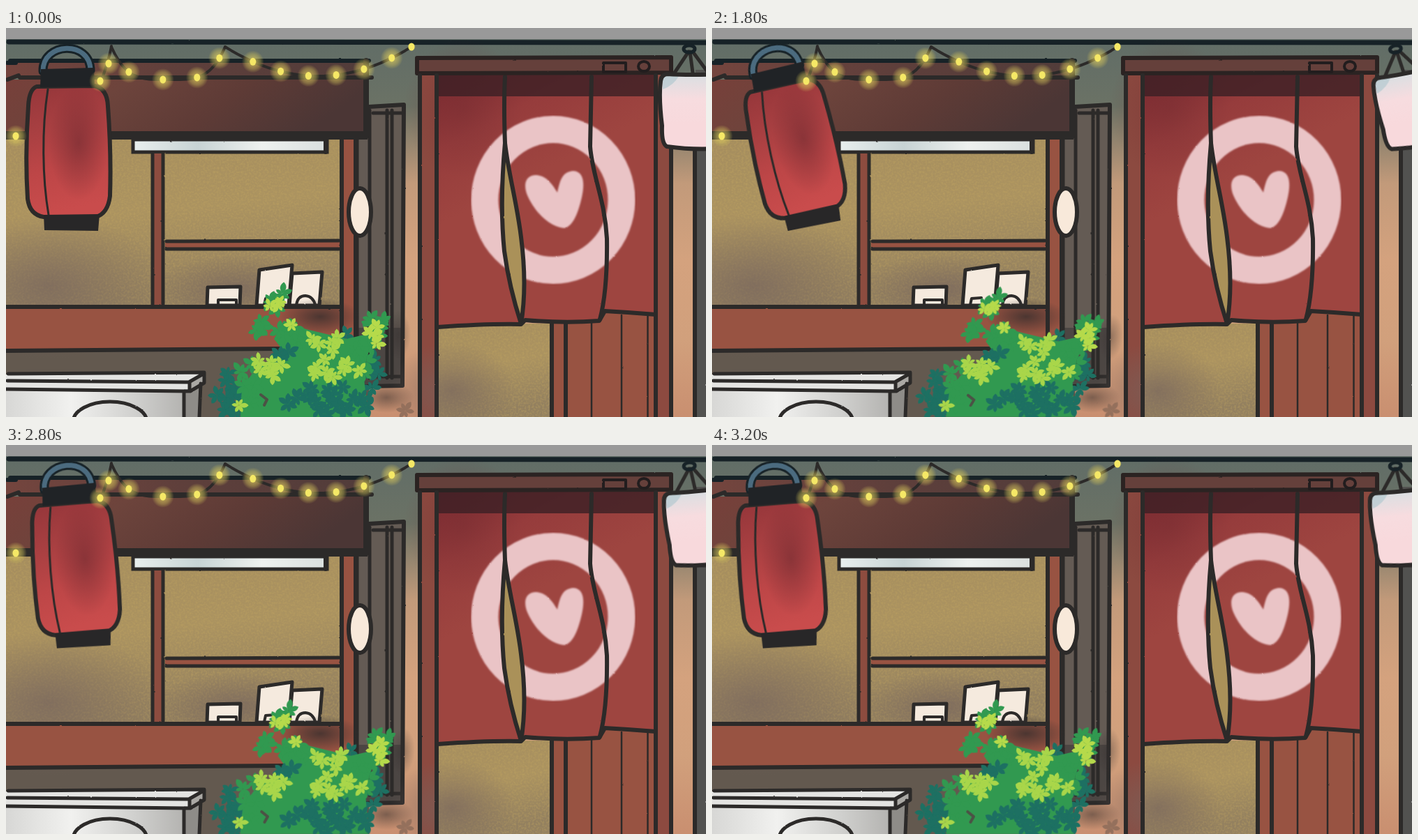
An HTML page that plays this animation: 1003x558 px, repeating every 3400 ms.

```html
<!DOCTYPE html>
<html lang="en">
<head>
<meta charset="utf-8">
<title>Shop front in the breeze</title>
<style>
html, body { margin: 0; width: 100%; height: 100%; overflow: hidden; background: #999; }
svg { display: block; width: 1003px; height: 558px; }
#lantern { transform-origin: 87px 35px; }
#lamp { transform-origin: 980px 28px; }
#bush { transform-origin: 0 550px; }
</style>
</head>
<body>
<svg id="stage" viewBox="0 0 1003 558" xmlns="http://www.w3.org/2000/svg"></svg>
<script>
const INK = '#2c2a29', NIGHT = '#172227', WOOD = '#985342', PINK = '#eac4c6';

let seed = 11;
const rnd = () => (seed = (seed * 16807) % 2147483647) / 2147483647;
const repeat = (n, make) => Array.from({ length: n }, (_, i) => make(i)).join('');

const box = (x, y, x2, y2, fill, more = '') =>
  `<rect x="${x}" y="${y}" width="${x2 - x}" height="${y2 - y}" fill="${fill}" ${more}/>`;
const shape = (d, fill, more = '') => `<path d="${d}" fill="${fill}" ${more}/>`;
const line = (d, w = 6, color = INK) =>
  shape(d, 'none', `stroke="${color}" stroke-width="${w}" stroke-linecap="round" stroke-linejoin="round"`);
const bars = (y, y2, w, ...xs) => line(xs.map(x => `M${x} ${y}V${y2}`).join(''), w);
const oval = (x, y, rx, ry, fill, more = '') =>
  `<ellipse cx="${x}" cy="${y}" rx="${rx}" ry="${ry}" fill="${fill}" ${more}/>`;
const group = (inner, more) => `<g ${more}>${inner}</g>`;

// Colours are spread evenly along a gradient.
const stops = colors => colors.map((c, i) =>
  `<stop offset="${i / (colors.length - 1)}" stop-color="${c}"/>`).join('');
const linear = (id, dx, dy, ...colors) =>
  `<linearGradient id="${id}" x1="0" y1="0" x2="${dx}" y2="${dy}">${stops(colors)}</linearGradient>`;
const radial = (id, ...colors) => `<radialGradient id="${id}">${stops(colors)}</radialGradient>`;

const defs = `<defs>
${linear('wall', 0, 1, '#5f6c67', '#6b7265', '#c29a7a', '#d4a27e', '#d1a07c', '#c98f70')}
${linear('awning', 1, .2, '#77403a', '#6d443c', '#5e3b36', '#4b3635')}
${linear('strip', 1, 0, '#74453e', '#5e3f3b', '#513c3a')}
${linear('glass', .2, 1, '#a58d5e', '#ab9360', '#93805f')}
${linear('cloth', .45, 1, '#7c2a30', '#963c3c', '#9e4540', '#9e4540', '#9e4540')}
${linear('red', .15, 1, '#95363a', '#a73f41', '#bd4647', '#c94c4c')}
${linear('white', 1, 0, '#e9efee', '#c7d3d4', '#eef1ef', '#d9dfde')}
${linear('stand', 1, 0, '#d7d7d5', '#f1f1ef', '#cfcfcd', '#aaa9a6')}
${linear('shade', 0, 1, '#d9dfe2', '#f7dcdf', '#f8d9dc', '#f8d9dc')}
${radial('glow', '#f6e468cc', '#e2d05f99', '#d2c35a66', '#d2c35a00')}
${radial('dusk', '#76645db3', '#76645d00')}
${radial('murk', '#302b2bbb', '#302b2b00')}
${radial('dim', '#6f2a3099', '#6f2a3000')}
<filter id="rough" x="0" y="0" width="1003" height="558" filterUnits="userSpaceOnUse" color-interpolation-filters="sRGB">
  <feTurbulence type="fractalNoise" baseFrequency=".12" numOctaves="2" seed="4"/>
  <feDisplacementMap in="SourceGraphic" scale="1.6" xChannelSelector="R" yChannelSelector="G"/>
</filter>
<filter id="grain" x="0" y="0" width="100%" height="100%" color-interpolation-filters="sRGB">
  <feTurbulence type="fractalNoise" baseFrequency=".35" numOctaves="2" seed="8"/>
  <feColorMatrix values="0 0 0 0 .76  0 0 0 0 .65  0 0 0 0 .38  1.6 0 0 0 -.62"/>
</filter>
<filter id="soft"><feGaussianBlur stdDeviation="1"/></filter>
</defs>`;

const pane = (x, y, x2, y2) => box(x, y, x2, y2, 'url(#glass)')
  + box(x, y, x2, y2, '#fff', 'filter="url(#grain)" opacity=".6"');

function walls() {
  return box(0, 0, 1003, 558, 'url(#wall)')
    + box(0, 0, 1003, 16, '#999')
    + box(0, 450, 520, 558, '#63594f')
    + box(988, 60, 1003, 558, '#525250')
    + bars(170, 558, 6, 987)
    + oval(545, 530, 40, 22, 'url(#murk)', 'opacity=".7"')
    + line('M4 20L1003 21', 7, NIGHT);
}

function shutter() {
  return box(503, 112, 571, 514, '#645b54')
    + box(505, 430, 570, 512, '#343233', 'opacity=".5"')
    + line('M520 113L570 110L568 513L516 514', 6)
    + line('M526 122H568M520 500H566', 5)
    + bars(118, 502, 5, 521, 546, 553)
    + bars(160, 470, 5, 503);
}

function shop() {
  const window = pane(0, 158, 482, 400)
    + oval(60, 370, 170, 105, 'url(#dusk)')
    + oval(330, 375, 120, 50, 'url(#dusk)');
  const roof = box(0, 48, 520, 72, 'url(#strip)')
    + box(0, 74, 515, 150, 'url(#awning)')
    + line('M6 47H520M2 50H14', 6, NIGHT)
    + line('M20 71H524M2 74L18 68', 6)
    + bars(47, 155, 8, 516)
    + box(0, 148, 518, 160, INK);
  const frame = box(182, 160, 460, 178, 'url(#white)', `stroke="${INK}" stroke-width="5"`)
    + bars(162, 178, 6, 458)
    + box(210, 180, 226, 397, '#8d4c3f') + bars(181, 396, 5, 210, 225)
    + box(228, 306, 478, 317, WOOD) + line('M230 306L477 305M230 317H477', 5)
    + box(480, 160, 502, 462, WOOD) + bars(161, 458, 6, 481, 501);
  const paper = (d, inner) => shape(d, '#f5eade') + line(d, 5) + line(inner, 4);
  const papers = paper('M289 372L336 371L335 398H288Z', 'M304 397V390H330V397')
    + paper('M410 352L453 350L449 398H406Z', 'M416 397Q418 384 429 384Q440 385 443 397')
    + paper('M363 347L410 340L405 398H359Z', 'M370 397L372 388L386 387');
  const sill = box(0, 400, 478, 462, WOOD)
    + oval(450, 414, 58, 26, 'url(#murk)')
    + line('M0 400H478M0 463L400 460H480');
  const bell = oval(507, 264, 16, 34, '#f8e9da', `stroke="${INK}" stroke-width="6"`);
  const stand = shape('M0 518H256L280 504L277 558H0Z', 'url(#stand)')
    + shape('M254 522L280 504L277 558H254Z', '#8e8c88')
    + shape('M0 497L284 494L282 505L263 520H0Z', '#e4e4e2')
    + shape('M263 509L284 495V508L264 520Z', '#aaa8a4')
    + line('M3 496L284 494V509L264 521L0 518M2 506L262 508L283 496M263 509V520M255 523V558M279 510L277 558', 5)
    + oval(149, 565, 53, 29, 'none', `stroke="${INK}" stroke-width="5"`);
  return window + shutter() + frame + roof + papers + sill + bell + stand;
}

function door() {
  const slit = 'M715 165C710 220 709 270 714 320Q721 372 738 424Q747 370 738 300C732 250 720 210 715 165Z';
  const hem = 'M619 429Q690 424 738 425L744 419Q800 424 850 420L858 406Q895 408 931 411';
  const behind = box(593, 66, 618, 558, '#8c4a40') + box(931, 66, 952, 558, '#8c4a40')
    + pane(619, 424, 780, 558)
    + oval(640, 520, 90, 70, 'url(#dusk)')
    + box(780, 400, 931, 558, WOOD)
    + bars(412, 558, 2.5, 839, 882, 919.5)
    + bars(423, 558, 6, 782, 802);
  const ring = oval(784, 246.5, 98, 101, 'none', `stroke="${PINK}" stroke-width="39"`);
  const heart = shape('M790 236C794 218 797 206 813 205C829 206 829 225 825 243'
    + 'C820 265 812 286 799 287C780 285 759 267 747 240C741 225 744 212 758 211C774 211 782 223 790 236Z', PINK);
  const cloth = shape(hem + 'V66H618Z', 'url(#cloth)')
    + oval(655, 115, 85, 100, 'url(#dim)', 'opacity=".6"')
    + group(ring + heart, 'filter="url(#soft)"')
    + box(618, 66, 931, 98, '#3d2025', 'opacity=".82"')
    + shape(slit, '#aa9159')
    + line('M715 70Q713 110 715 165') + line(slit)
    + line('M839 70L837 170C840 212 858 245 861 302Q862 376 851 418')
    + line(hem);
  const lintel = box(589, 43, 953, 65, '#65403b')
    + line('M589 65V43L953 42V64L589 65', 6, '#2b2322')
    + line('M856 50H888V63H856Z', 4, '#221d1e')
    + oval(914, 55, 8, 7, 'none', 'stroke="#221d1e" stroke-width="4"');
  return behind + cloth + lintel + bars(68, 558, 6, 593, 617, 931, 953);
}

function lantern() {
  const body = 'M44 84Q33 88 32 112Q27 180 31 245Q34 268 54 271H129Q146 266 149 241'
    + 'Q151 180 146 112Q145 87 127 83Z';
  const handle = 'M53 62C52 20 121 17 121 61';
  return line(handle, 13, NIGHT) + line(handle, 7, '#4b6b7f')
    + shape(body, 'url(#red)')
    + oval(104, 165, 43, 82, 'url(#dim)')
    + line(body) + line('M60 88C51 145 52 215 61 268', 3)
    + shape('M50 59L126 57L127 84L49 85Z', '#202326')
    + shape('M54 268L134 267L132 291L55 290Z', '#282728');
}

function lamp() {
  const body = 'M947 66Q980 68 1030 66V172Q990 176 947 170Q939 166 940 140Q935 100 938 76Q939 67 947 66Z';
  return shape(body, 'url(#shade)')
    + shape('M941 69L964 69Q957 82 941 88Z', '#b4c9d0', 'opacity=".7"')
    + line(body)
    + line('M978 34L958 64M980 34L984 64M984 34L1006 64', 5)
    + oval(979, 30, 8, 5, 'none', `stroke="${NIGHT}" stroke-width="5"`);
}

function bulb(x, y, r = 16) {
  return oval(x, y, r, r, 'url(#glow)') + oval(x, y, 4.5, 5.5, '#f5e866');
}

// A hanging cord between two hooks; a higher power makes a flatter sag.
function swag(x, x2, sag, power, count, first, step, last) {
  const at = t => [x + (x2 - x) * t, 27 + sag * (1 - Math.abs(2 * t - 1) ** power)];
  const cord = 'M' + Array.from({ length: 31 }, (_, i) => at(i / 30).map(v => v.toFixed(1))).join('L');
  return line(cord, 4) + repeat(count, i => {
    const t = Math.min(last, first + step * i);
    return bulb(...at(t), t < 1 ? 16 : 6);
  });
}

function lights() {
  return line('M151 26Q149 40 138 72', 4)
    + swag(151, 314, 47, 4, 4, .153, .3, .95)
    + swag(314, 581, 42, 2, 7, .149, .149, 1)
    + bulb(147, 51) + bulb(135, 76) + bulb(14, 155);
}

// A fan of plump leaves around a centre.
function sprig(x, y, r, color) {
  const n = 6, turn = rnd() * 360;
  const leaves = repeat(n, i => {
    const len = r * (.65 + rnd() * .5), w = len * .5, a = turn + i * 360 / n + rnd() * 20;
    return `<path d="M0 0Q${len * .6} ${-w} ${len} 0Q${len * .6} ${w} 0 0" transform="rotate(${a})"/>`;
  });
  return group(leaves, `transform="translate(${x} ${y})" fill="${color}"`);
}

// Sprigs spread evenly over an oval by the golden angle.
function clump(color, r, n, x, y, rx, ry) {
  return repeat(n, i => {
    const a = i * 2.4 + rnd(), d = Math.sqrt((i + .4) / n);
    return sprig(x + rx * d * Math.cos(a), y + ry * d * Math.sin(a), r, color);
  });
}

function bush() {
  const dark = (...c) => clump('#1d7062', 15, ...c);
  const mid = (...c) => clump('#319950', 15, ...c);
  const light = (...c) => clump(rnd() < .5 ? '#a9d64a' : '#b6da4b', 13, ...c);
  const heap = 'M384 446L398 420L430 432L488 446L530 436L511 490L520 558H336L338 512L366 484L398 464Z';
  return oval(562, 440, 18, 34, 'url(#murk)', 'opacity=".55"')
    + sprig(572, 549, 15, '#94705c')
    + dark(10, 322, 524, 20, 34) + dark(7, 518, 490, 18, 45) + dark(1, 485, 440, 4, 4)
    + shape(heap, '#319950')
    + mid(4, 386, 388, 16, 14) + mid(3, 364, 430, 8, 10) + mid(6, 408, 440, 22, 16)
    + mid(5, 532, 428, 14, 16) + mid(5, 514, 472, 16, 30) + mid(5, 350, 508, 16, 38)
    + dark(16, 462, 535, 62, 22) + dark(2, 400, 462, 12, 12)
    + light(3, 386, 397, 13, 6) + light(1, 408, 426, 2, 2) + light(5, 460, 450, 24, 16)
    + light(6, 374, 488, 22, 15) + light(8, 474, 490, 40, 16) + light(4, 529, 440, 12, 14)
    + light(1, 333, 540, 2, 2)
    + line('M365 526L374 533L370 541', 4, '#4c5145');
}

const stage = document.getElementById('stage');
stage.innerHTML = defs
  + group(walls() + shop() + door(), 'filter="url(#rough)"')
  + group(lamp(), 'id="lamp"') + group(lantern(), 'id="lantern"')
  + lights() + group(bush(), 'id="bush"');

// After a long rest, a gust (half, full, half, rest) comes every six beats.
const BEAT = 200, BEATS = 17, REST = 8;
const gust = n => n < REST || n === BEATS ? 0 : [1, 2, 1, 0, 0, 0][(n - REST) % 6];
const sway = {
  lantern: p => `rotate(${-2 * p * (p + 1)}deg)`,
  lamp: p => `rotate(${-5.4 * p}deg)`,
  bush: p => `skewX(${-3 * p ** .65}deg) scaleY(${1 - .017 * p * (p - 1)})`
};
for (const [id, pose] of Object.entries(sway)) {
  const frames = Array.from({ length: BEATS + 1 }, (_, n) =>
    ({ offset: n / BEATS, transform: pose(gust(n)), easing: 'steps(1, end)' }));
  document.getElementById(id).animate(frames, { duration: BEAT * BEATS, iterations: Infinity });
}
</script>
</body>
</html>
```
